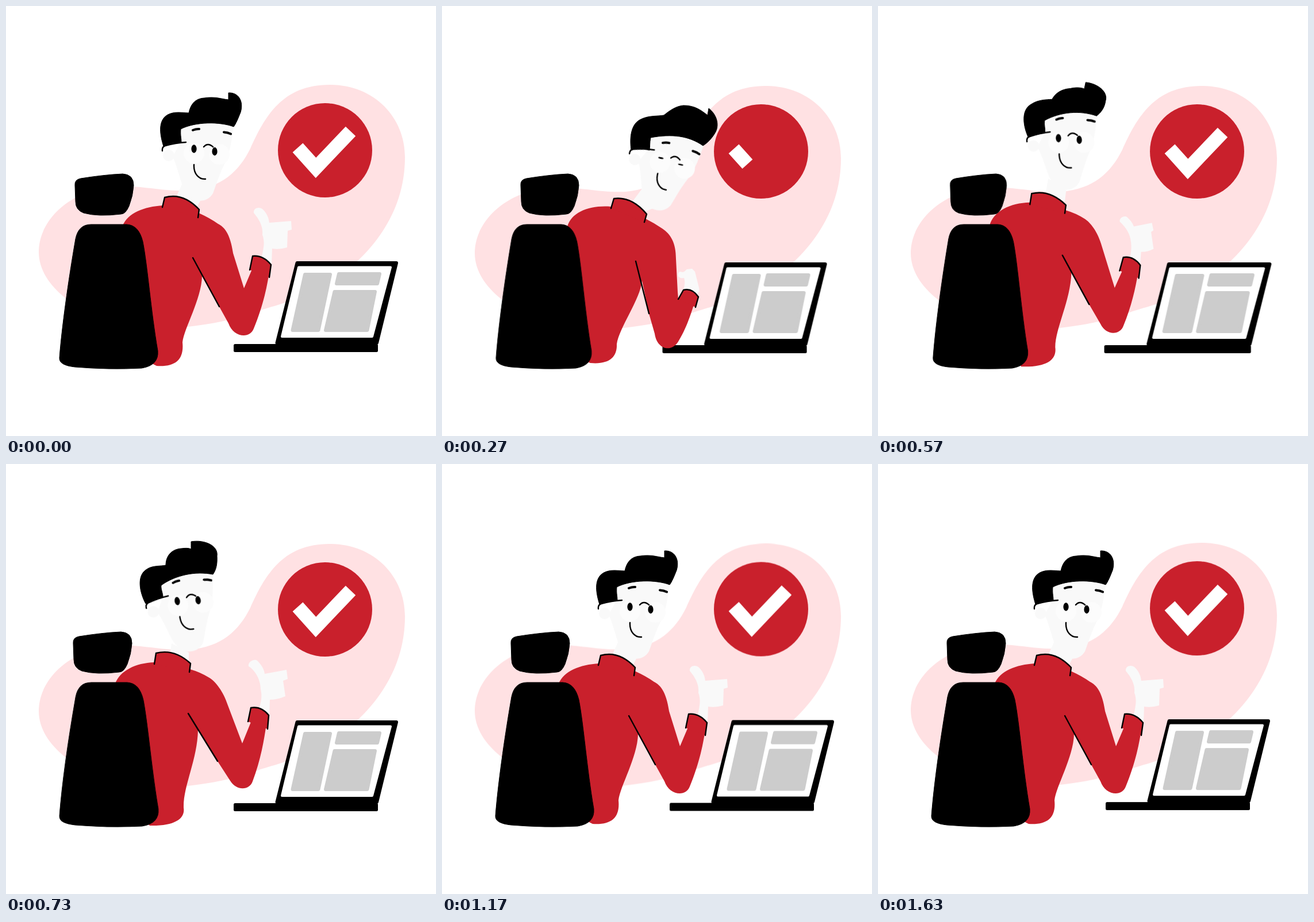
An HTML page that plays this animation: 748x748 px, repeating every 1660 ms.

```html
<!DOCTYPE html>
<html lang="en">
<head>
<meta charset="utf-8">
<title>Approved</title>
<style>
html, body { margin: 0; height: 100%; overflow: hidden; background: #fff; }
svg { display: block; width: 100%; height: 100%; }

.red { fill: #c9202c; }
.skin { fill: #f9f9f9; }
.lens { fill: #fcfcfc; }
.ink { fill: none; stroke: #000; stroke-width: 2.4; stroke-linecap: round; stroke-linejoin: round; }
.brow { stroke-width: 4; }
.seat { stroke: #000; }
.panel { fill: #ccc; stroke: #ccc; stroke-width: 6; stroke-linejoin: round; }

.drift, .laptop, .chair, .rest, .bob, .head, .eye, .brow, #hair, #neck, #body, #seams, #hand, #tick {
  animation: 1660ms ease-in-out infinite;
}
.drift { animation-name: drift; animation-timing-function: linear; }
.laptop { animation-name: laptop; transform-origin: 542px 0; }
.chair { animation-name: chair; transform-origin: 178.5px 0; }
.rest { animation-name: rest; transform-origin: 171px 0; }
.bob { animation-name: bob; }
.head { animation-name: head; transform-origin: 345px 250.5px; }
.eye { animation-name: blink; transform-box: fill-box; transform-origin: center; }
.brow { animation-name: frown; }
#hair { animation-name: hair; }
#neck { animation-name: neck; }
#body { animation-name: body; }
#seams { animation-name: seams; }
#hand { animation-name: hand; }
#tick { animation-name: tick; animation-timing-function: linear; }

/* Poses: rest, lean in (270 ms), rise (430 ms), sit back (730 ms), dip (900 ms), rest */
@keyframes drift {
  0%, 1.8%, 100% { transform: translateY(-2px); }
  14%, 60% { transform: none; }
}
@keyframes tick {
  0%, 1.8% { stroke-dashoffset: 0; }
  8%, 13% { stroke-dashoffset: 101; }
  16.27% { stroke-dashoffset: 74; }
  24.5%, 100% { stroke-dashoffset: 0; }
}
@keyframes laptop {
  0%, 1.8%, 43.98%, 100% { transform: translateX(0) scaleX(1); }
  16.27% { transform: translateX(-12.5px) scaleX(1); animation-timing-function: ease-in; }
  25.9% { transform: translateX(0) scaleX(1.048); animation-timing-function: ease-out; }
}
@keyframes chair {
  0%, 1.8%, 69.3%, 100% { transform: translateX(0) scaleX(1); }
  16.27% { transform: translateX(-1.5px) scaleX(.97); animation-timing-function: ease-in; }
  25.9% { transform: translateX(-2px) scaleX(.885); animation-timing-function: ease-out; }
  43.98%, 54.22% { transform: translateX(.5px) scaleX(1.005); }
}
@keyframes rest {
  0%, 1.8%, 69.3%, 100% { transform: translateX(0) scaleX(1); }
  16.27% { transform: translateX(16.5px) scaleX(.99); animation-timing-function: ease-in; }
  25.9% { transform: translateX(16px) scaleX(.885); animation-timing-function: ease-out; }
  43.98% { transform: translateX(-3px) scaleX(1); }
  54.22% { transform: translateX(5px) scaleX(1); }
}
@keyframes bob {
  0%, 25.9%, 43.98%, 100% { transform: none; }
  37% { transform: translateY(-8px); }
}
@keyframes head {
  0%, 1.8%, 69.3%, 100% { transform: translate(0, 0) rotate(0deg); }
  16.27% { transform: translate(53px, 19.5px) rotate(11.5deg); animation-timing-function: ease-in; }
  25.9% { transform: translate(17px, -11px) rotate(10deg); animation-timing-function: ease-out; }
  43.98% { transform: translate(-29px, -13px) rotate(-9.5deg); }
  54.22% { transform: translate(-5px, 13px) rotate(-6.4deg); }
}
@keyframes blink {
  0%, 9%, 22%, 100% { transform: none; }
  14.5%, 16.5% { transform: scaleY(.2); }
}
@keyframes frown {
  0%, 9%, 22%, 100% { transform: none; }
  14.5%, 16.5% { transform: translateY(6px); }
}
@keyframes hair {
  0%, 1.8%, 69.3%, 100% { d: path("M274 244C268 225 261 192 290 186C300 184 310 186 318 186C321 172 328 161 345 160C365 157 375 162 387 163L387 151C404 150 414 165 408 185C404 195 400 205 396 210C372 201 330 201 304 214C303 225 305 230 305 237C290 238 280 240 274 244Z"); }
  16.27% { animation-timing-function: ease-in; d: path("M329 251C327 235 326 206 346 197C360 190 375 192 386 190C396 182 407 174 420 173C440 173 450 181 462 190L464 178C477 188 483 205 476 219C470 230 462 238 454 243C430 226 400 222 363 229C361 238 362 245 361 251C348 247 340 246 329 251Z"); }
  25.9% { animation-timing-function: ease-out; d: path("M296 222C291 205 287 176 309 167C320 160 335 154 349 157C365 158 375 158 390 157C405 153 415 153 428 157L435 149C450 162 458 182 450 194C443 203 430 207 418 210C390 192 360 188 327 197C325 207 326 214 323 220C315 221 305 221 296 222Z"); }
  43.98% { d: path("M243 243C233 225 226 194 245 183C255 176 270 178 278 176C278 160 288 148 305 147C312 146 318 146 322 148L322 135C345 131 370 142 367 160C368 175 365 185 360 192C330 186 295 193 270 211C269 218 273 224 273 232C262 234 252 238 243 243Z"); }
  54.22% { d: path("M268 264C260 245 252 222 270 211C283 204 298 207 310 204C313 190 320 178 338 176C352 174 365 174 374 176L374 164C392 162 402 175 398 192C396 202 390 212 387 220C360 212 325 216 296 232C295 240 298 248 299 255C285 257 275 259 268 264Z"); }
}
@keyframes neck {
  0%, 1.8%, 69.3%, 100% { d: path("M306 310L340 335L332 350L295 335Z"); }
  16.27% { animation-timing-function: ease-in; d: path("M350 315L372 350L352 358L330 342Z"); }
  25.9% { animation-timing-function: ease-out; d: path("M312 298L345 326L338 342L305 326Z"); }
  43.98% { d: path("M288 312L318 328L318 350L285 334Z"); }
  54.22% { d: path("M308 325L335 347L333 362L297 347Z"); }
}
@keyframes body {
  0%, 1.8%, 69.3%, 100% { d: path("M273 347C240 349 212 360 203 382L230 610L262 626C295 628 310 615 307 585C310 560 340 510 341 470L371 523L387 552C395 576 424 580 431 561C448 520 455 485 459 455Q445 434 428 437L428 458L414 491L395 430C390 395 379 384 369 379Q355 369 335 360L336 353Q310 328 276 333Z"); }
  16.27% { animation-timing-function: ease-in; d: path("M294 349C258 346 225 358 218 384L230 610L258 621C292 624 305 610 304 588C308 560 345 510 348 478L360 535L370 570C374 598 400 604 412 582C428 556 436 525 442 508Q434 493 420 494L411 510L410 498L407 440C407 412 398 397 383 387Q370 378 354 370L356 362Q328 328 299 335Z"); }
  25.9% { animation-timing-function: ease-out; d: path("M276 336C240 336 205 352 202 382L230 610L248 624C295 626 310 612 307 585C310 560 338 510 341 468L366 523L381 556C390 584 416 580 422 567C438 535 446 510 451 488Q442 460 428 462L424 480L413 498L396 415C390 385 378 373 370 367Q355 357 338 352L338 345Q308 316 279 321Z"); }
  43.98% { d: path("M258 345C225 346 198 360 190 382L230 610L250 629C295 630 312 616 309 598C308 560 333 515 334 462L368 517L390 551C402 570 424 567 429 552C443 515 449 480 453 452Q442 422 426 425L426 449L411 486L386 420C378 395 364 378 354 372Q338 362 320 357L321 347Q295 322 261 329Z"); }
  54.22% { d: path("M273 357C240 359 218 368 208 382L230 610L262 626C295 628 310 615 307 585C310 560 340 515 341 475L371 528L388 556C396 579 424 582 431 563C448 523 455 490 458 463Q445 442 429 443L427 466L414 498L396 440C390 407 378 394 369 389Q355 379 335 371L336 365Q310 338 276 344Z"); }
}
@keyframes seams {
  0%, 1.8%, 69.3%, 100% { d: path("M272 350L276 333Q308 324 336 354L334 368M424 459L429 435Q447 433 461 450L458 472M325 438L371 523"); }
  16.27% { animation-timing-function: ease-in; d: path("M294 352L299 335Q330 331 356 362L352 376M411 510L420 494Q435 490 446 506L441 524M337 444L360 535"); }
  25.9% { animation-timing-function: ease-out; d: path("M276 340L279 321Q310 315 338 345L336 358M419 484L428 462Q444 459 455 477L451 497M328 433L366 523"); }
  43.98% { d: path("M258 348L261 329Q293 321 321 347L319 362M421 448L426 424Q444 421 457 437L455 461M317 434L368 517"); }
  54.22% { d: path("M273 362L276 344Q308 337 336 365L333 379M424 466L429 443Q447 440 461 458L458 480M325 446L371 528"); }
}
@keyframes hand {
  0%, 1.8%, 69.3%, 100% { d: path("M444 445C446 425 452 415 446 398C448 380 436 366 431 360C430 350 442 349 447 354C455 362 457 370 458 377L496 374L497 389L490 391L489 420Q476 424 463 422L462 448Z"); }
  16.27% { animation-timing-function: ease-in; d: path("M418 500C421 490 424 482 421 473C417 474 413 473 411 470C410 463 413 461 418 463C422 463 423 460 426 458L435 457L440 462L442 470L447 490Q449 497 444 500L442 510Z"); }
  25.9% { animation-timing-function: ease-out; d: path("M434 466C436 455 434 445 432 430C426 431 421 427 418 419C418 413 424 412 427 415C431 417 433 419 436 418L455 413L459 421L462 423L467 457Q462 462 455 461L452 480Z"); }
  43.98% { d: path("M440 432C441 418 447 410 443 392C443 372 430 356 422 352C420 344 432 338 437 342C446 351 449 358 450 365L488 358L490 374L482 377L486 404Q472 410 459 410L458 438Z"); }
  54.22% { d: path("M444 452C446 435 452 425 446 408C448 390 437 378 431 373C430 362 442 360 447 365C455 373 457 381 458 388L496 385L497 400L490 402L490 429Q476 432 463 431L462 455Z"); }
}
</style>
</head>
<body>
<svg viewBox="0 0 748 748">
  <g class="drift">
    <path fill="#ffe1e3" d="M57 430C57 370 120 315 205 315C250 317 280 325 320 323C375 318 405 290 425 250C450 195 480 139 563 139C640 139 694 195 694 265C694 340 660 400 610 447C575 480 530 505 470 523C425 535 400 551 315 560C270 563 240 560 200 552C130 540 57 490 57 430Z"/>
    <circle class="red" cx="555" cy="253" r="82"/>
    <path id="tick" d="M507.5 248.5L539 283.5L599.5 220" fill="none" stroke="#fff" stroke-width="24" pathLength="100" stroke-dasharray="100 110"/>
    <g class="laptop">
      <path d="M506.500 449H679L645 588H471.500Z" stroke="#000" stroke-width="6" stroke-linejoin="round"/>
      <path d="M509 456.500H669L637 577H480Z" fill="#fff" stroke="#fff" stroke-width="4" stroke-linejoin="round"/>
      <rect x="396" y="590" width="251" height="14" rx="2.5"/>
      <path class="panel" d="M520 469H564L543.5 566H498.5ZM579 468H650L646 485H575ZM571.5 499H642L628.5 566H556Z"/>
    </g>
  </g>

  <g class="bob">
    <path id="neck" class="skin"/>
    <g class="head">
      <path class="skin" d="M304 214Q350 196 396 210C392 235 390 255 380 275C370 295 366 310 360 326Q350 342 330 338Q312 330 306 310C300 290 296 275 290 262L304 236Z"/>
      <circle class="skin" cx="283" cy="260" r="10"/>
      <circle class="lens" cx="327" cy="256" r="18"/>
      <circle class="lens" cx="371" cy="258" r="18"/>
    </g>
    <path id="hair" stroke="#000" stroke-linejoin="round"/>
    <g class="head">
      <path class="ink brow" d="M325 216Q331 213.500 336 214M379 219.500Q386 220 391 222.500"/>
      <ellipse class="eye" cx="327" cy="248.500" rx="4.600" ry="7.200"/>
      <ellipse class="eye" cx="363" cy="253" rx="4.600" ry="7.200"/>
      <path class="ink" d="M272 252Q271 245 277 243M277 243Q295 238 313 237M344 245Q351 237 360 245M327 276C326 291 335 302 347 301"/>
    </g>
  </g>

  <path id="hand" class="skin"/>
  <path id="body" class="red"/>
  <path id="seams" class="ink" style="fill:#c9202c"/>

  <path class="seat rest" d="M120 312Q119 302 130 300C155 296 180 293 203 292Q222 293 222 312Q221 330 214 348Q208 362 200 362Q160 367 135 360Q121 355 121 340Z"/>
  <path class="seat chair" d="M121 405Q126 380 148 380H210Q231 381 238 410C246 450 252 530 264 600Q266 625 236 630Q180 633 120 628Q92 625 93 612C97 560 108 480 121 405Z"/>
</svg>
</body>
</html>
```
